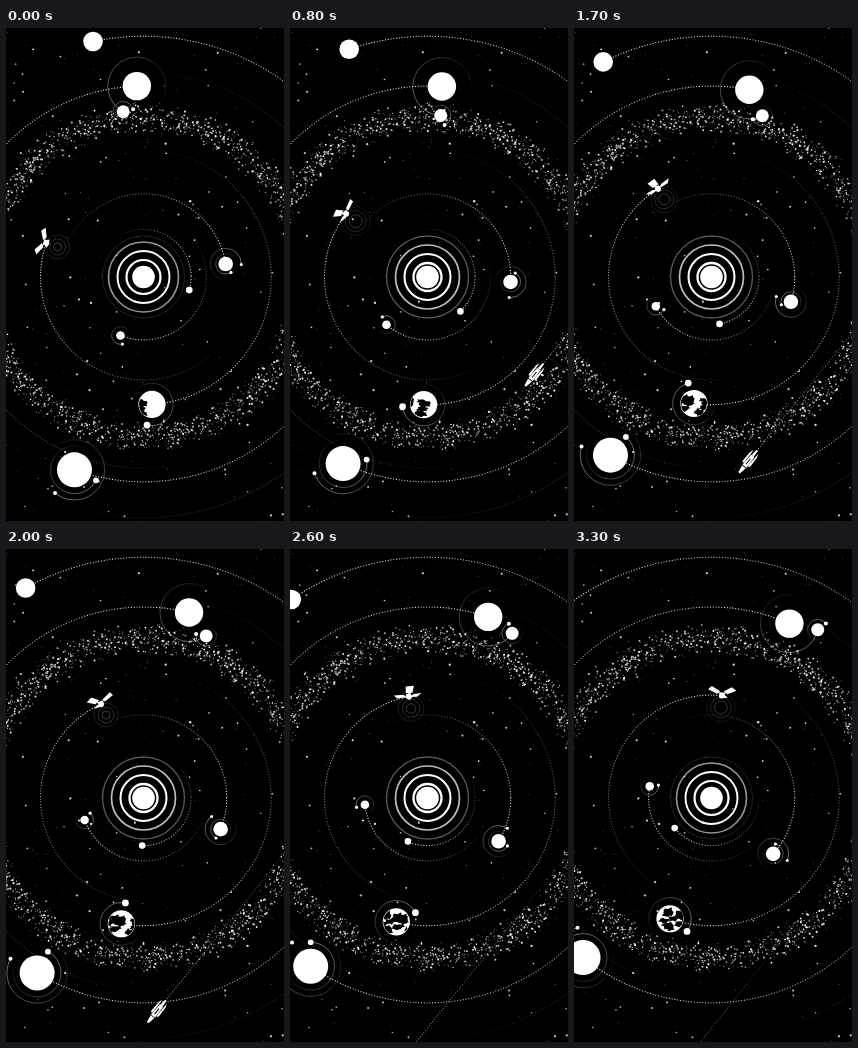
Write an HTML page with a canvas that moves like this. It is 278 px wide and 493 px high and loops after 3400 ms.

```html
<!DOCTYPE html>
<html lang="en">
<head>
<meta charset="utf-8">
<title>Orbits</title>
<style>
html, body { margin: 0; width: 100%; height: 100%; overflow: hidden; background: #000; }
canvas { display: block; width: 278px; height: 493px; }
</style>
</head>
<body>
<canvas id="stage"></canvas>
<script>
const W = 278, H = 493, LOOP = 3400, STEP = 100, TAU = Math.PI * 2;
const SUN = { x: 137.5, y: 249 };
const canvas = document.getElementById('stage');
const g = canvas.getContext('2d');
const scale = window.devicePixelRatio || 1;
canvas.width = W * scale;
canvas.height = H * scale;

const rad = deg => deg * Math.PI / 180;
const white = a => `rgba(255,255,255,${a})`;
const polar = (c, r, a) => ({ x: c.x + r * Math.cos(a), y: c.y + r * Math.sin(a) });
const many = (n, make) => Array.from({ length: n }, make);

let seed = 11;
function rnd(min = 0, max = 1) {
  seed = (seed * 16807) % 2147483647;
  return min + (max - min) * seed / 2147483647;
}

function disc(p, r, fill = '#fff') {
  g.fillStyle = fill;
  g.beginPath();
  g.arc(p.x, p.y, r, 0, TAU);
  g.fill();
}

function ring(p, r, alpha, width) {
  g.strokeStyle = white(alpha);
  g.lineWidth = width;
  g.beginPath();
  g.arc(p.x, p.y, r, 0, TAU);
  g.stroke();
}

function poly(points) {
  g.fillStyle = '#fff';
  g.beginPath();
  points.forEach(([x, y]) => g.lineTo(x, y));
  g.fill();
}

function dotted(on) {
  g.setLineDash(on ? [0, 2.8] : []);
  g.lineCap = on ? 'round' : 'butt';
}

// Circle that is brightest just behind the moving body and fades out along its path
function trail(c, r, a, dir, alpha, span) {
  const fade = g.createConicGradient(a, c.x, c.y);
  const at = f => dir > 0 ? 1 - f : f;
  fade.addColorStop(at(0), white(alpha));
  fade.addColorStop(at(span), white(0));
  fade.addColorStop(at(1), white(0));
  g.strokeStyle = fade;
  g.beginPath();
  g.arc(c.x, c.y, r, 0, TAU);
  g.stroke();
}

// Orbit radius, start angle in degrees, degrees per second, disc radius, satellites
const body = (r, a, v, size, ...moons) => ({ r, a, v, size, moons, draw: p => disc(p, size) });

const planets = [
  body(47.6, 16, 37.8, 3.3),
  body(62.9, 111.5, 24, 4.3, body(8.8, 77, -244, 1.6)),
  body(83.2, -9, 15.5, 7.3, body(10, 58, -150, 1.6), body(15.6, 2, 116.3, 1.5)),
  { ...body(103, 199.3, 23.2), draw: probe },
  { ...body(127.7, 86.2, 6.9, 13.6, body(21.2, 103.5, 88.8, 3.4)), draw: globe },
  body(191, 268, 7.9, 14.2, body(29, 118, -32.1, 6.5, body(10.2, -14, 102.1, 2))),
  body(204.8, 109.7, 5.8, 17.5, body(23.9, 26, -44.6, 2.9), body(30.2, 130, 39.2, 2)),
  body(240.8, 257.9, -8.6, 9.8)
];

const makeStar = (size, alpha) => ({ x: rnd(0, W), y: rnd(0, H), size, alpha });
const stars = [
  ...many(200, () => makeStar(rnd(0.3, 0.6), rnd(0.2, 0.5))),
  ...many(95, () => makeStar(rnd(0.7, 1.2), rnd(0.6, 0.95)))
];

const belt = many(2500, () => ({
  r: 159.5 + (rnd() + rnd() - 1) * 16,
  a: rnd(0, TAU),
  size: 0.4 + rnd() ** 2 * 0.7,
  alpha: rnd(0.45, 1)
}));

// Each continent is a cluster of rough blobs around one longitude
const land = [-62, -135, -205].flatMap(lon => many(8, () => ({
  lon: lon + rnd(-24, 24),
  lat: rnd(-7, 11),
  w: rnd(3.5, 6.5),
  h: rnd(2, 4.5)
})));

function drawBelt(s) {
  for (const b of belt)
    disc(polar(SUN, b.r, b.a + rad(4 * s)), b.size, white(b.alpha));
}

function drawSun(s) {
  ring(SUN, 41, 0.16, 0.8);
  const shift = (s / 0.3 % 1) * 9;
  for (let r = 8 + shift; r < 44; r += 9) {
    const light = Math.min(1, Math.max(0.1, (46 - r) / 19));
    if (r > 11) ring(SUN, r, light, 2.8 - r / 30);
  }
  disc(SUN, 11.3);
}

// Spinning three-panel craft, seen at a slant, sending rings towards the sun
function probe(p, s, a) {
  const source = polar(SUN, 91, a);
  for (let k = 0; k < 3; k++) {
    const r = 4 + k * 4 + s * 8 % 4;
    ring(source, r, 0.36 - r * 0.018, 0.8);
  }
  g.save();
  g.translate(p.x, p.y);
  g.rotate(a + Math.PI / 2);
  for (let k = 0; k < 3; k++) {
    const b = rad(30 + 111 * s) + k * TAU / 3;
    const flat = (u, w) => [
      u * Math.cos(b) - w * Math.sin(b),
      -1 - 0.45 * (u * Math.sin(b) + w * Math.cos(b)) - 0.22 * u
    ];
    const panel = (from, to, w1, w2) =>
      poly([flat(from, -w1), flat(to, -w2), flat(to, w2), flat(from, w1)]);
    panel(0, 5, 0.8, 0.8);
    panel(4, 14, 3.4, 4.2);
  }
  poly([[-2.5, -3], [2.5, -3], [3, 1], [1, 3], [-1, 3], [-3, 1]]);
  g.restore();
}

function globe(p, s) {
  disc(p, 13.6);
  g.save();
  g.beginPath();
  g.arc(p.x, p.y, 13, 0, TAU);
  g.clip();
  g.fillStyle = '#000';
  for (const { lon, lat, w, h } of land) {
    const l = rad(lon + 60 * s), depth = Math.cos(l);
    if (depth <= 0) continue;
    const x = p.x + Math.sin(l) * Math.sqrt(13.6 ** 2 - lat ** 2);
    g.beginPath();
    for (let k = 0; k < 11; k++) {
      const b = k / 11 * TAU, rough = 0.9 + 0.3 * Math.sin(k * 2.6 + lon);
      g.lineTo(x + w * (0.3 + 0.7 * depth) * rough * Math.cos(b), p.y + lat + h * rough * Math.sin(b));
    }
    g.fill();
  }
  g.restore();
}

function drawShip(s) {
  const x = 306.3 - 77.9 * s, y = 270 + 96.4 * s;
  g.save();
  g.translate(x, y);
  g.rotate(Math.atan2(96.4, -77.9));

  const reach = 300;
  const fade = g.createLinearGradient(0, 0, -reach, 0);
  fade.addColorStop(0, white(0.8));
  fade.addColorStop(1, white(0));
  g.strokeStyle = fade;
  g.lineWidth = 1;
  dotted(true);
  g.beginPath();
  g.moveTo(-reach, 0);
  g.lineTo(0, 0);
  g.stroke();
  dotted(false);

  poly([[-15, -0.8], [-8, -1.5], [-8, 1.5], [-15, 0.8]]);
  for (const side of [-1, 1])
    poly([[-13, 3 * side], [2, 2.6 * side], [4, 3.6 * side], [2, 4.8 * side], [-9, 4.4 * side]]);
  poly([[-8, -2], [5, -2.6], [14, -1], [14, 1], [5, 2.6], [-8, 2]]);
  g.fillStyle = '#000';
  g.fillRect(5.5, -3, 0.8, 6);
  g.fillRect(-4, -0.5, 7, 1);
  g.restore();
}

function drawMoons(parent, center, s) {
  for (const m of parent.moons) {
    const a = rad(m.a + m.v * s), p = polar(center, m.r, a);
    g.lineWidth = 0.9;
    trail(center, m.r, a, m.v, 0.5, 0.8);
    drawMoons(m, p, s);
    m.draw(p);
  }
}

function render(s) {
  g.setTransform(scale, 0, 0, scale, 0, 0);
  g.fillStyle = '#000';
  g.fillRect(0, 0, W, H);
  stars.forEach(p => disc(p, p.size, white(p.alpha)));
  dotted(true);
  g.lineWidth = 1.25;
  for (const b of planets)
    trail(SUN, b.r, rad(b.a + b.v * s), b.v, 0.95, 0.36 + b.r / 1000);
  dotted(false);
  drawBelt(s);
  drawSun(s);
  drawShip(s);
  for (const b of planets) {
    const a = rad(b.a + b.v * s), p = polar(SUN, b.r, a);
    drawMoons(b, p, s);
    b.draw(p, s, a);
  }
}

const start = performance.now();
function tick() {
  const t = (performance.now() - start) % LOOP;
  render(Math.floor(t / STEP) * STEP / 1000);
  requestAnimationFrame(tick);
}
tick();
</script>
</body>
</html>
```
